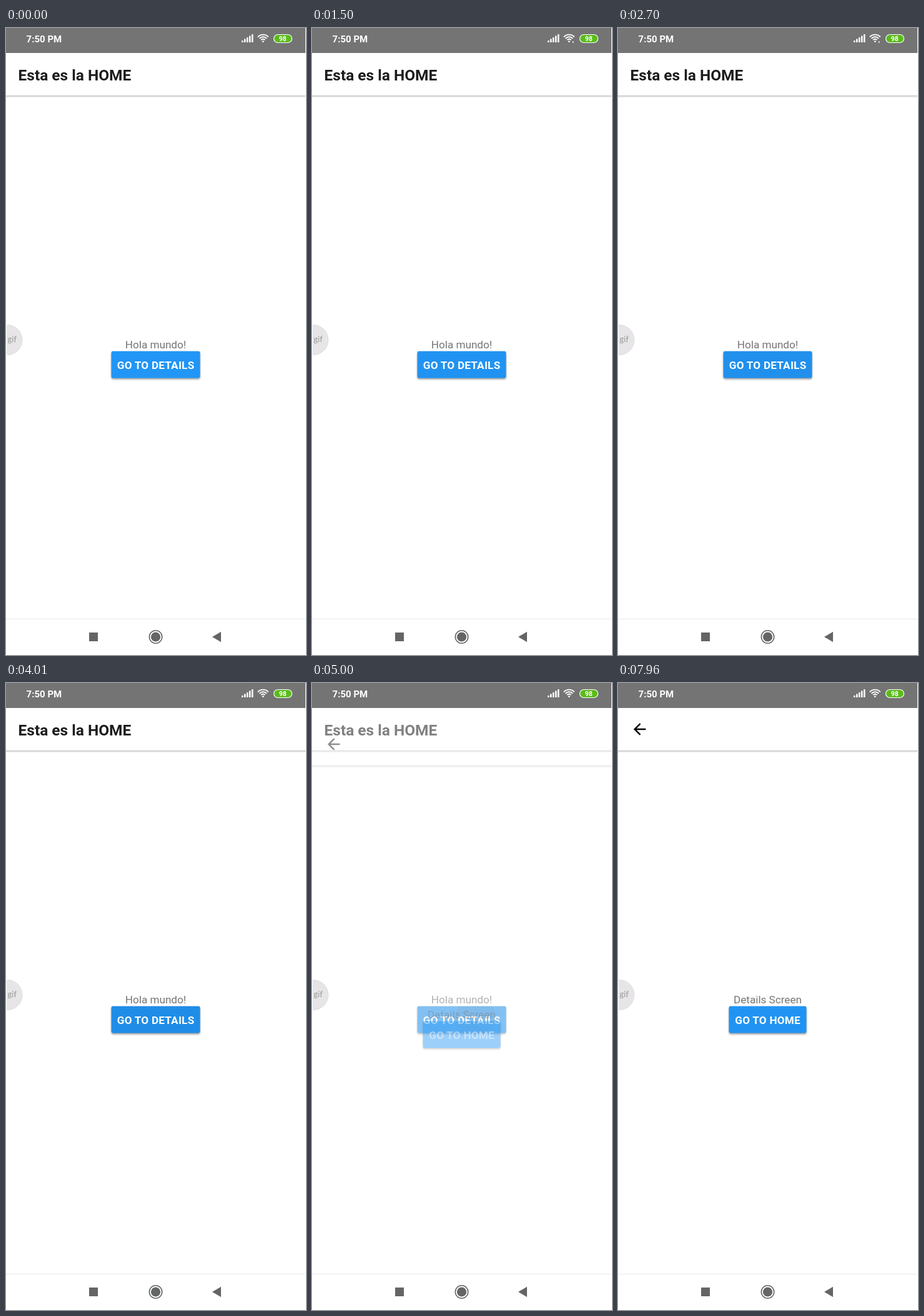
An HTML page that plays this animation: 480 by 1004 pixels, repeating every 8000 ms.

```html
<!DOCTYPE html>
<html lang="es">
<head>
<meta charset="utf-8">
<title>Esta es la HOME</title>
<style>
  html, body { margin: 0; width: 100%; height: 100%; overflow: hidden; background: #fff; }
  svg { display: block; width: 480px; height: 1004px; font-family: Roboto, sans-serif; }
  .bold { font-weight: 700; }
  .middle { text-anchor: middle; }
  .label { font-weight: 700; font-size: 17.1px; letter-spacing: .25px; text-anchor: middle; fill: #fff; }
  .button { filter: drop-shadow(0 2px 1.8px rgba(0, 0, 0, .4)); }
</style>
</head>
<body>
<svg viewBox="0 0 480 1004">
  <defs>
    <clipPath id="buttonClip"><rect x="168.5" y="517.5" width="142" height="43" rx="2.4"/></clipPath>
    <g id="header">
      <rect y="40" width="479" height="906" fill="#fff"/>
      <rect y="108" width="479" height="1" fill="#c8c8c8"/>
      <rect y="109" width="479" height="1" fill="#dadada"/>
      <rect y="110" width="479" height="1" fill="#eee"/>
      <rect y="111" width="479" height="1" fill="#f9f9f9"/>
    </g>
  </defs>

  <g id="home">
    <use href="#header"/>
    <text class="bold" x="19.6" y="84" font-size="24.44" fill="#1c1c1e">Esta es la HOME</text>
    <text class="middle" x="239.5" y="513" font-size="17.1" fill="#757575">Hola mundo!</text>
    <rect id="homeButton" class="button" x="168.5" y="517.5" width="142" height="43" rx="2.4"/>
    <circle id="ripple" cx="262" cy="535" clip-path="url(#buttonClip)" fill="#000" opacity=".06"/>
    <text class="label" x="239.6" y="546">GO TO DETAILS</text>
  </g>

  <g id="details">
    <use href="#header"/>
    <path transform="translate(20.1 59.3) scale(1.222)" d="M20 11H7.83l5.59-5.59L12 4l-8 8 8 8 1.41-1.41L7.83 13H20z"/>
    <text class="middle" x="239.5" y="513" font-size="17.1" fill="#757575">Details Screen</text>
    <rect id="detailsButton" class="button" x="177.5" y="517.5" width="124" height="43" rx="2.4"/>
    <text class="label" x="239.6" y="546">GO TO HOME</text>
  </g>

  <!-- Floating badge -->
  <path d="M2 475.5a24 24 0 0 1 0 48z" fill="#e7e5e7" stroke="#dedcde"/>
  <text x="2.5" y="503" font-size="13" fill="#999" style="font-family: Lato, sans-serif">gif</text>

  <!-- Status bar -->
  <rect width="479" height="40" fill="#747474"/>
  <g fill="#fff">
    <text class="bold" x="32.6" y="22.8" font-size="15">7:50 PM</text>
    <g id="signal"></g>
    <g id="wifi" transform="translate(411.3 22)" fill="none" stroke="#fff" stroke-width="1.9">
      <circle r="1.4" cy="-.4" fill="#fff" stroke="none"/>
    </g>
    <path id="down" d="M416.4 21.6h2.6l-1.3 2.8z"/>
    <path id="up" d="M418.2 23.6h2.6l-1.3-2.8z"/>
    <rect x="428.5" y="10.5" width="29" height="13" rx="6.5" fill="#5abc1a" stroke="#fff" stroke-width="1.2"/>
    <text class="bold middle" x="442.8" y="20.8" font-size="10.5">98</text>
  </g>

  <!-- Navigation bar -->
  <rect y="946" width="480" height="58" fill="#fff"/>
  <rect y="946" width="479" height="1" fill="#eee6ee"/>
  <g fill="#636663">
    <rect x="133" y="968" width="14" height="14"/>
    <circle cx="239.5" cy="975" r="7.6"/>
    <circle cx="239.5" cy="975" r="10.2" fill="none" stroke="#636663" stroke-width="1.6"/>
    <path d="M330 975l14-8.2v16.4z"/>
  </g>
</svg>

<script>
  const LOOP = 8000;
  const HOME_PRESSES = [800, 1000, 1200, 1500, 1700, 2000, 2200, 2400, 2700, 2900, 3200, 3400, 3600];
  const DETAILS_PRESSES = [7540, 7740, 7960];
  const SLIDE_TIMES = [4620, 4740, 4820, 4900, 5010, 5090];
  const SLIDE_DISTANCE = 72.5;

  const $ = id => document.getElementById(id);
  const passed = (times, t) => times.filter(time => time <= t).length;
  const between = (t, from, to) => t >= from && t < to;
  const show = (id, visible) => $(id).setAttribute('display', visible ? 'inline' : 'none');

  function add(parent, tag, attributes) {
    const element = document.createElementNS('http://www.w3.org/2000/svg', tag);
    for (const name in attributes) element.setAttribute(name, attributes[name]);
    $(parent).append(element);
  }

  for (let i = 0; i < 5; i++) {
    const height = 3 + 2.5 * i;
    add('signal', 'rect', { x: 377 + 4 * i, y: 23 - height, width: 2.5, height });
  }
  for (const r of [4.2, 7.8, 11.4]) {
    add('wifi', 'path', { d: `M${-.74 * r} ${-.67 * r}A${r} ${r} 0 0 1 ${.74 * r} ${-.67 * r}` });
  }

  // A held button darkens a little with every step.
  function buttonColor(steps) {
    const k = steps / HOME_PRESSES.length;
    return `rgb(${33 - 2 * k}, ${150 - 9 * k}, ${246 - 14 * k})`;
  }

  // The new screen fades in slowly at first, then faster.
  function fade(p) {
    if (p < .5) return p * .5;
    if (p < .9) return .25 + (p - .5) * 1.125;
    return .7 + (p - .9) * 3;
  }

  function draw(t) {
    $('homeButton').setAttribute('fill', buttonColor(passed(HOME_PRESSES, t)));
    $('detailsButton').setAttribute('fill', buttonColor(passed(DETAILS_PRESSES, t)));

    const step = passed(SLIDE_TIMES, t);
    const elapsed = step ? SLIDE_TIMES[step - 1] - SLIDE_TIMES[0] : 0;
    const progress = step ? .19 + .81 * elapsed / 470 : 0;
    show('details', step > 0);
    // Each part fades by itself, so overlapping parts blend with each other.
    for (const part of $('details').children) part.setAttribute('opacity', fade(progress));
    $('details').setAttribute('transform', `translate(0 ${Math.round(SLIDE_DISTANCE * (1 - progress))})`);
    $('ripple').setAttribute('r', step ? 14 + elapsed * .065 : 0);

    show('down', between(t, 500, 4010) || between(t, 5380, 6280));
    show('up', between(t, 5380, 7340));
  }

  function tick() {
    draw(performance.now() % LOOP);
    requestAnimationFrame(tick);
  }
  tick();
</script>
</body>
</html>
```
